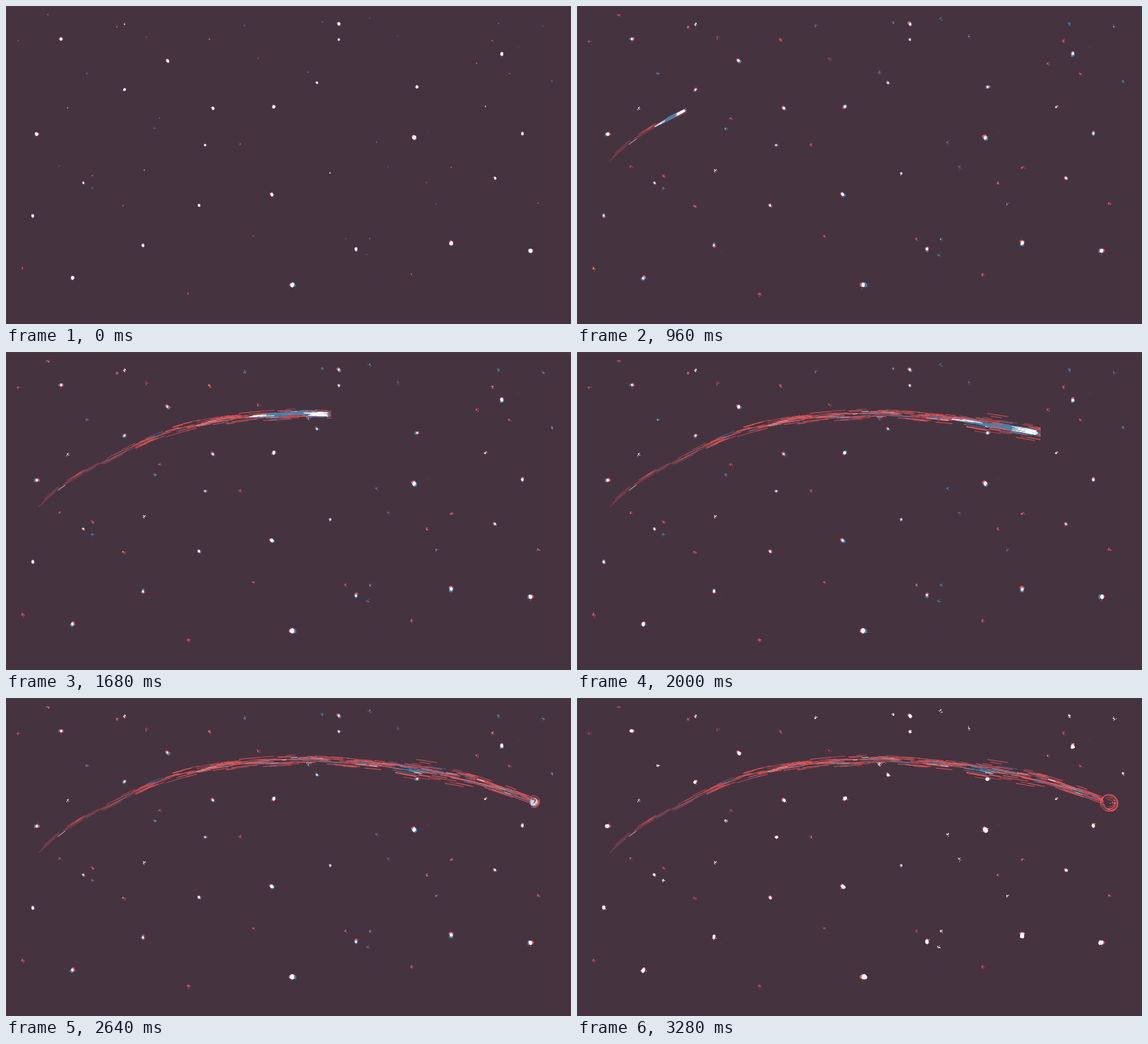
Write an HTML page with a canvas that moves like this. It is 825 by 464 pixels and loops after 3360 ms.

```html
<!DOCTYPE html>
<html lang="en">
<head>
<meta charset="utf-8">
<title>Shooting star</title>
<style>
  html, body { margin: 0; width: 100%; height: 100%; overflow: hidden; background: #463340; }
  canvas { display: block; width: 825px; height: 464px; }
</style>
</head>
<body>
<canvas id="sky" width="825" height="464"></canvas>
<script>
const ctx = document.getElementById('sky').getContext('2d');
const W = 825, H = 464, LOOP = 3360, STEP = 80;
const BG = '#463340', RED = '#ee5a5c', BLUE = '#4584ad', WHITE = '#ffffff';

// x, y, radius, direction from red to blue in eighths of a turn
const BIG = [
  [80,48,3.6,4], [486,26,3.6,1], [236,80,3.8,1], [173,122,3.2,3], [391,147,3.8,7],
  [724,70,4.2,2], [600,118,3.5,4], [596,192,5,1], [45,187,4.2,4], [388,275,4.1,1],
  [39,306,3.4,6], [200,349,3.5,6], [97,397,4.2,3], [418,407,5.4,0], [650,346,4.7,2],
  [766,357,4.8,4], [511,355,3.9,2], [754,186,3.5,2], [714,251,3,1], [282,291,3.1,1],
  [302,149,3.4,1], [454,112,2.8,1], [486,49,2.6,1], [291,203,2.7,0], [113,258,2.7,5]
];
const REDS = [
  [61,13], [162,31], [18,51], [205,46], [297,49], [368,77], [224,164], [342,202],
  [78,234], [126,248], [171,292], [24,383], [266,420], [361,336], [496,340],
  [592,392], [614,258], [650,236], [687,84], [735,99], [710,51], [777,288]
];
const BLUES = [
  [348,29], [462,24], [531,18], [572,44], [719,26], [784,30], [118,99], [441,97],
  [217,179], [541,199], [558,235], [628,289], [531,340], [527,363], [797,110], [126,266]
];
const PALE = [[173,27], [90,149], [202,240], [473,244], [700,147]];
const FAINT = [[210,358], [748,60], [531,401], [615,184]];

const PATH = [[44,229], [68,207], [95,187], [150,156], [210,127], [261,110], [330,97],
  [400,91], [450,90], [550,98], [600,106], [677,119], [720,132], [780,154]];
const SPREAD = [[44,1], [70,6], [200,8], [330,8], [450,11], [540,11], [605,17], [700,14], [760,8], [780,5]];
const HEAD = [[360,44], [640,95], [960,160], [1280,261], [1680,475], [2000,677], [2240,768]];

function random(seed) {
  let a = seed * 7919 + 13;
  return () => {
    a = (a + 0x6D2B79F5) | 0;
    let n = Math.imul(a ^ (a >>> 15), 1 | a);
    n = (n + Math.imul(n ^ (n >>> 7), 61 | n)) ^ n;
    return ((n ^ (n >>> 14)) >>> 0) / 4294967296;
  };
}

// Smooth curve through points sorted by their first value
function curve(pts, x) {
  const last = pts.length - 1;
  if (x <= pts[0][0]) return pts[0][1];
  if (x >= pts[last][0]) return pts[last][1];
  let i = 0;
  while (x > pts[i + 1][0]) i++;
  const slope = k => {
    const a = pts[Math.max(k - 1, 0)], b = pts[Math.min(k + 1, last)];
    return (b[1] - a[1]) / (b[0] - a[0]);
  };
  const [x0, y0] = pts[i], [x1, y1] = pts[i + 1], h = x1 - x0, u = (x - x0) / h;
  const u2 = u * u, u3 = u2 * u;
  return y0 * (2 * u3 - 3 * u2 + 1) + y1 * (3 * u2 - 2 * u3) +
    h * (slope(i) * (u3 - 2 * u2 + u) + slope(i + 1) * (u3 - u2));
}

const pathY = x => curve(PATH, x);

function dash(x0, x1, offset, color, alpha, width = 1) {
  ctx.globalAlpha = alpha;
  ctx.strokeStyle = color;
  ctx.lineWidth = width;
  ctx.beginPath();
  for (let k = 0; k <= 4; k++) {
    const x = x0 + (x1 - x0) * k / 4;
    ctx.lineTo(x, pathY(x) + offset);
  }
  ctx.stroke();
}

function blob(x, y, rx, ry, color, alpha, rnd) {
  ctx.globalAlpha = alpha;
  ctx.fillStyle = color;
  ctx.beginPath();
  for (let k = 0; k < 9; k++) {
    const a = k / 9 * Math.PI * 2, j = 0.8 + rnd() * 0.35;
    ctx.lineTo(x + Math.cos(a) * rx * j, y + Math.sin(a) * ry * j);
  }
  ctx.fill();
}

function specks(x, y, r, count, color, alpha, rnd) {
  ctx.globalAlpha = alpha;
  ctx.fillStyle = color;
  for (let k = 0; k < count; k++) {
    const a = rnd() * Math.PI * 2, d = r * Math.sqrt(rnd());
    ctx.fillRect(Math.round(x + Math.cos(a) * d), Math.round(y + Math.sin(a) * d), 1, 1);
  }
}

function bigStar([x, y, r, dir], i, frame, first, final) {
  const rnd = random(i + 1), wob = random(i * 31 + frame % 6 + 200);
  const a = dir * Math.PI / 4, dx = Math.cos(a) * r * 0.35, dy = Math.sin(a) * r * 0.35;
  const cool = final ? WHITE : BLUE;
  const s = first ? 0.55 : 0.72;
  blob(x - dx, y - dy, r * s, r * s, RED, 0.95, rnd);
  blob(x + dx, y + dy, r * s, r * s, cool, 0.95, rnd);
  if (!first) specks(x, y, r * 1.15, 5, rnd() < 0.5 ? RED : cool, 0.7, rnd);
  const core = r * (first || final ? 0.66 : 0.42 + wob() * 0.26);
  const shift = (wob() - 0.5) * 0.8;
  blob(x + dx * shift, y + dy * shift, core * 0.9, core * 1.08, WHITE, 1, wob);
}

function smallStar([x, y], i, color, frame, first, final) {
  const rnd = random(i + 400), size = 0.7 + rnd() * 0.6;
  if (first) {
    blob(x, y - 0.5, size, size * 1.1, color, 0.85, rnd);
    return;
  }
  const tone = final && color === BLUE ? WHITE : color;
  const alpha = final && color === RED ? 0.65 : 0.85;
  blob(x, y, size * 1.5, size * 1.7, tone, alpha * 0.8, rnd);
  specks(x, y, 2.8, 6, tone, alpha, rnd);
  const wob = random(i * 17 + frame % 6 + 900);
  if (color === WHITE) specks(x, y, 2.5, 4, i % 2 ? BLUE : RED, 0.8, rnd);
  else if (wob() < 0.25) specks(x, y, 1.2, 1, WHITE, 0.8, wob);
}

function drawStars(frame) {
  const first = frame === 0, final = frame === LOOP / STEP - 1;
  BIG.forEach((p, i) => bigStar(p, i, frame, first, final));
  REDS.forEach((p, i) => smallStar(p, i, RED, frame, first, final));
  BLUES.forEach((p, i) => smallStar(p, i + 40, BLUE, frame, first, final));
  PALE.forEach((p, i) => smallStar(p, i + 70, WHITE, frame, first, final));
  FAINT.forEach(([x, y], i) => {
    ctx.globalAlpha = 0.45;
    ctx.fillStyle = i % 2 ? RED : BLUE;
    ctx.fillRect(x, y, 1, 1);
  });
}

const trail = (() => {
  const rnd = random(77), list = [];
  for (let i = 0; i < 350; i++) {
    const x = 44 + 724 * Math.pow(rnd(), 0.75);
    const side = (rnd() + rnd() + rnd() - 1.5) / 1.5;
    const len = 12 + rnd() * 26, pick = rnd();
    const cool = x > 555 && x < 645 ? 0.28 : 0.15;
    const color = pick < cool ? BLUE : pick > 0.94 ? WHITE : RED;
    const alpha = (0.5 + rnd() * 0.5) * (x < 180 ? 0.68 : 1);
    list.push({
      x, color, alpha,
      len: color === WHITE ? len * 0.5 : len,
      offset: side * curve(SPREAD, x + len / 2) * (color === RED ? 1 : 0.65)
    });
  }
  return list;
})();

function drawTrail(head) {
  for (const s of trail) {
    if (s.x < head) dash(s.x, Math.min(s.x + s.len, head), s.offset, s.color, s.alpha);
  }
}

function drawBody(head, t, frame) {
  const fade = Math.max(0, Math.min(1, (2480 - t) / 320));
  const len = Math.min(130, 20 + 0.23 * (head - 44), head - 44) * fade;
  if (len < 6) return;
  const half = Math.min(6, 3.4 + (head - 44) * 0.005);
  const girth = k => half * Math.sqrt(Math.min(1, k * 8)) * Math.pow(1 - k, 0.8);

  ctx.globalAlpha = 0.8;
  ctx.fillStyle = BLUE;
  ctx.beginPath();
  for (let k = 0; k <= 40; k++) {
    const u = k <= 20 ? k / 20 : (40 - k) / 20, x = head - u * len * 0.85;
    ctx.lineTo(x, pathY(x) + girth(u) * (k <= 20 ? -0.75 : 0.75));
  }
  ctx.fill();

  const rnd = random(frame + 500);
  const streak = (from, to, reach, color, spread, alpha) => {
    const a = from + rnd() * (to - from), b = Math.min(1, a + reach * (0.5 + rnd()));
    const off = (rnd() * 2 - 1) * girth((a + b) / 2) * spread;
    dash(head - b * len, head - a * len, off, color, alpha);
  };
  for (let k = 0; k < 26; k++) streak(0, 0.8, 0.25, BLUE, 1.1, 0.9);
  for (let k = 0; k < 5; k++) streak(0.05, 0.8, 0.15, RED, 1.2, 0.7);
  for (let k = 0; k < 7; k++) streak(0.65, 0.9, 0.15, WHITE, 0.8, 0.85);
  for (let k = 0; k < 15; k++) streak(0.03, 0.1, 0.18, WHITE, 0.6, 0.95);
}

function ring(x, y, r, color, alpha, rnd) {
  ctx.globalAlpha = alpha;
  ctx.strokeStyle = color;
  ctx.lineWidth = 1;
  const start = rnd() * 7, sweep = 2 + rnd() * 3.5, squash = 0.85 + rnd() * 0.2;
  ctx.beginPath();
  ctx.ellipse(x + rnd() - 0.5, y + rnd() - 0.5, r, r * squash, rnd(), start, start + sweep);
  ctx.stroke();
}

function drawBurst(t, frame) {
  if (t < 2160) return;
  const p = Math.min(1, (t - 2160) / 1120), rnd = random(frame + 800);
  const r = 5 + 8 * p, x = 766 + 11 * p, y = 150 + 3.5 * p, glow = Math.max(0, 1 - p * 1.05);
  for (let k = 0; k < 9; k++) ring(x, y, r * (0.45 + rnd() * 0.55), RED, 0.75, rnd);
  ring(x, y, r, RED, 0.8, rnd);
  if (glow > 0) {
    for (let k = 0; k < 6; k++) ring(x, y, r * (0.3 + rnd() * 0.45), BLUE, Math.min(1, glow * 1.5), rnd);
    for (let k = 0; k < 5; k++) ring(x, y, r * (0.2 + rnd() * 0.5), WHITE, Math.min(1, glow * 1.6), rnd);
    blob(x - 1, y - 1, 3.5 * glow, 3 * glow, WHITE, 0.8, rnd);
  }
  specks(x, y, r * 0.7, 6, WHITE, 0.8, rnd);
}

function draw(now) {
  const frame = Math.floor((now % LOOP) / STEP), t = frame * STEP;
  ctx.globalAlpha = 1;
  ctx.fillStyle = BG;
  ctx.fillRect(0, 0, W, H);
  ctx.fillStyle = '#4d3a47';
  ctx.fillRect(0, 0, W, 1);
  ctx.fillRect(0, 0, 1, H);
  const head = curve(HEAD, t);
  if (head > 44) {
    drawTrail(head);
    drawBody(head, t, frame);
    drawBurst(t, frame);
  }
  drawStars(frame);
}

let begin = null;
function tick(now) {
  if (begin === null) begin = now;
  draw(now - begin);
  requestAnimationFrame(tick);
}
draw(0);
requestAnimationFrame(tick);
</script>
</body>
</html>
```
